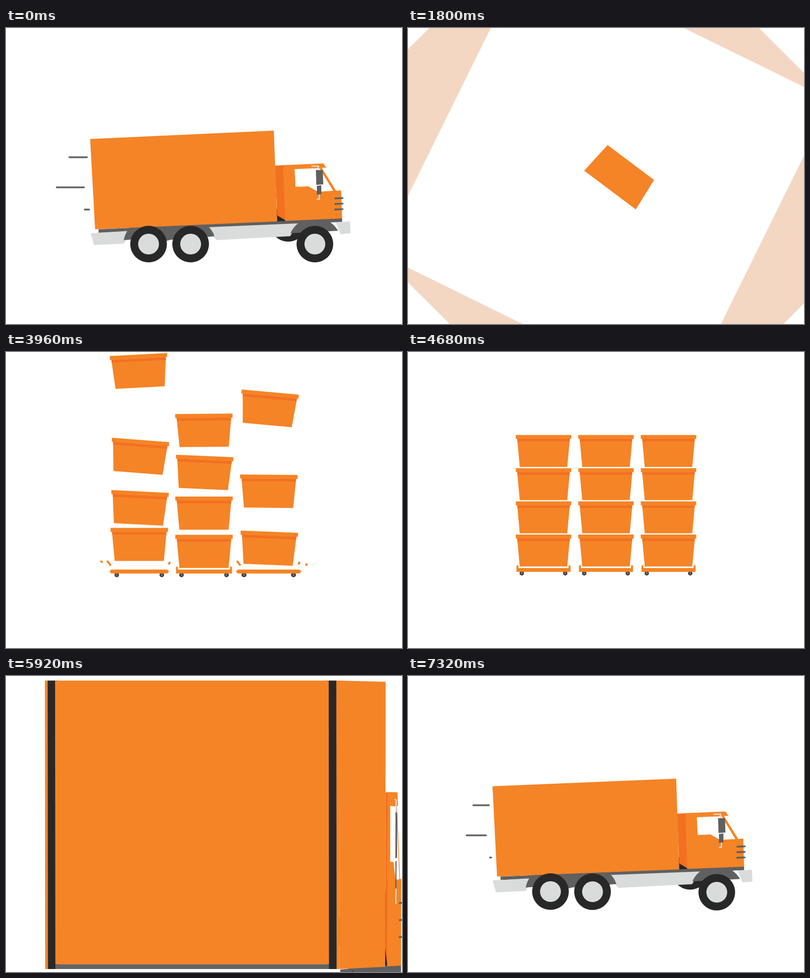
Animation, 800 px wide and 600 px high, one loop 7360 ms. Source, as an HTML page with a canvas:

```html
<!DOCTYPE html>
<html lang="en">
<head>
<meta charset="utf-8">
<title>Moving day</title>
<style>
html, body { margin: 0; width: 100%; height: 100%; overflow: hidden; background: #fff; }
canvas { display: block; width: 800px; height: 600px; }
</style>
</head>
<body>
<canvas id="stage" width="800" height="600"></canvas>
<script>
const ctx = document.getElementById('stage').getContext('2d');
const LOOP = 7360, STEP = 40;
const ORANGE = '#f58426', DEEP = '#f37021', DARK = '#282828', GREY = '#606060', PALE = '#d9dcdb', PEACH = '#f3d7c3';

const clamp = (v, a = 0, b = 1) => Math.min(b, Math.max(a, v));
const lerp = (a, b, p) => a + (b - a) * p;
const mix = (a, b, p) => a.map((v, i) => lerp(v, b[i], p));
const span = (t, a, b) => clamp((t - a) / (b - a));
const smooth = p => p * p * (3 - 2 * p);
const easeOut = (p, n = 2) => 1 - (1 - p) ** n;
const pulse = (t, a, b) => Math.sin(Math.PI * span(t, a, b));
const rad = deg => deg * Math.PI / 180;

// Perspective map taking four corners to four others, flat lists of x, y.
function perspective(from, to) {
  const m = [];
  for (let i = 0; i < 8; i += 2) {
    const x = from[i], y = from[i + 1], u = to[i], v = to[i + 1];
    m.push([x, y, 1, 0, 0, 0, -u * x, -u * y, u], [0, 0, 0, x, y, 1, -v * x, -v * y, v]);
  }
  for (let c = 0; c < 8; c++) {
    let best = c;
    for (let r = c + 1; r < 8; r++) if (Math.abs(m[r][c]) > Math.abs(m[best][c])) best = r;
    [m[c], m[best]] = [m[best], m[c]];
    for (let r = 0; r < 8; r++) {
      if (r === c) continue;
      const f = m[r][c] / m[c][c];
      for (let k = c; k < 9; k++) m[r][k] -= f * m[c][k];
    }
  }
  const h = m.map((row, i) => row[8] / row[i]);
  return (x, y) => {
    const w = h[6] * x + h[7] * y + 1;
    return [(h[0] * x + h[1] * y + h[2]) / w, (h[3] * x + h[4] * y + h[5]) / w];
  };
}

const flat = (x, y) => [x, y];
let place = flat;

function trace(pts) {
  ctx.beginPath();
  for (let i = 0; i < pts.length; i += 2) ctx.lineTo(...place(pts[i], pts[i + 1]));
}
function shape(color, ...pts) {
  trace(pts);
  ctx.fillStyle = color;
  ctx.fill();
}
function stroke(color, width, ...pts) {
  trace(pts);
  ctx.strokeStyle = color;
  ctx.lineWidth = width;
  ctx.stroke();
}
const rect = (color, l, t, r, b) => shape(color, l, t, r, t, r, b, l, b);
function disc(color, x, y, r, from = 0, to = 360) {
  const pts = [];
  for (let i = 0; i <= 48; i++) {
    const a = rad(lerp(from, to, i / 48));
    pts.push(x + r * Math.cos(a), y + r * Math.sin(a));
  }
  shape(color, ...pts);
}
function posed(x, y, tilt, scale, paint) {
  ctx.save();
  ctx.translate(x, y);
  ctx.rotate(rad(tilt));
  ctx.scale(scale, scale);
  paint();
  ctx.restore();
}

// Truck: the cargo side, seen plainly, edge-on behind the door, and half turned
const SIDE = [170, 225, 541, 208, 548, 392, 180, 408];
const EDGE_ON = [768, -30, 770, -30, 770, 630, 768, 630];
const TURNED = [274, 174, 755, 187, 749, 420, 277, 443];

// The rear rises a little about the front corner while idling.
function idleSide(t) {
  const lift = 0.004 * (t < 1400 ? smooth(span(t, 120, 560)) : 1 - span(t, 7320, LOOP));
  return SIDE.map((v, i) => i % 2 ? v + (SIDE[i - 1] - 548) * lift : v - (SIDE[i + 1] - 392) * lift);
}
const turnIn = t => span(t, 5680, 6400) ** 1.5;
function sideQuad(t) {
  if (t < 1400) return idleSide(t);
  if (t < 6400) return mix(EDGE_ON, TURNED, turnIn(t));
  return mix(TURNED, idleSide(t), easeOut(span(t, 6400, 7000)));
}

function drive(t) {
  return 754 * (1 - Math.cos(Math.PI * clamp(t / 1040))) / 2;
}

function truck(t) {
  const dx = t < 1400 ? drive(t) : 0;
  const map = perspective(SIDE, sideQuad(t));
  place = (x, y) => { const p = map(x, y); return [p[0] + dx, p[1]]; };
  const turn = t < 1400 ? 0 : 1 - span(t, 6400, 6800);

  const slide = 12 * (1 - turn);
  shape('#7b7d7d', 172 + slide, 375, 185 + slide, 375, 185 + slide, 393, 176 + slide, 393);
  disc(GREY, 318, 396 - 25 * turn, 36);
  disc(DARK, 570, 396 - 25 * turn, 37);

  // chassis, bumpers and wheel arches
  shape(GREY, 187, 408, 679, 385, 679, 393, 187, 415);
  shape(PALE, 171, 416, 254, 411, 238, 437, 178, 440);
  shape(PALE, 404, 404, 590, 396, 574, 422, 425, 430);
  shape(PALE, 666, 394, 695, 392, 696, 416, 676, 418);
  for (const x of [288, 373]) disc(GREY, x, 438, 50.6, 189, 342);
  disc(GREY, 624, 438, 54, 204, 330);

  // cab
  ctx.globalAlpha = 1 - turn;
  shape(DARK, 548, 392, 550, 386, 556, 383, 566, 391);
  ctx.globalAlpha = 1;
  shape(DEEP, 543, 279, 562, 278, 565, 390, 548, 380);
  shape(ORANGE, 560, 278, 641, 274.5, 647, 283, 638, 283.5, 667, 330, 677, 329, 679, 386, 564, 391);
  shape('#fff', 583, 286, 633, 284, 661, 330, 630, 332, 611, 321, 585, 322);
  ctx.lineCap = 'butt';
  stroke(PALE, 2.5, 617, 280, 631, 280, 631, 289);
  stroke(PALE, 2.5, 633, 337, 633, 347, 628, 347);
  shape(GREY, 626, 288, 640, 288, 641, 317, 627, 318);
  shape(GREY, 628, 320, 637, 319, 637, 337, 628, 338);
  ctx.lineCap = 'round';
  for (let i = 0; i < 3; i++) stroke(GREY, 3.6, 665, 345.5 + 11.2 * i, 680, 344.8 + 11.2 * i);

  shape(ORANGE, ...SIDE);
  for (const x of [288, 373, 624]) {
    const y = 438 + turn * (420 - x) * 0.03;
    disc(DARK, x, y, 37);
    disc(PALE, x, y, 21);
  }
  place = flat;
}

function speedLines(t) {
  const time = t > 1400 ? t - LOOP : t;
  const lead = drive(time), lag = drive(time - 90);
  ctx.lineCap = 'round';
  // right end, height, length, growth per ms
  for (const [x, y, len, rate] of [[163.5, 262, 35.5, 0.1], [157.5, 323, 55, 0.4], [168, 368, 9, 0.17]]) {
    const now = clamp(len + rate * time, 0, len + 20);
    if (now > 0) stroke(GREY, 3.6, x - now + lag, y, x + lead, y);
  }
}

// Rear doorway
const OPENING = [32, -30, 768, -30, 768, 630, 32, 630];

function doorQuad(t) {
  if (t < 5680) {
    const z = lerp(1.5, 1, smooth(span(t, 4440, 5080)));
    return OPENING.map((v, i) => i % 2 ? 300 + (v - 300) * z : 400 + (v - 400) * z);
  }
  const [x0, y0, , , , , x1, y1] = TURNED;
  const side = sideQuad(t), p = turnIn(t);
  const top = mix([32, -30], [x0, y0], p), bottom = mix([32, 630], [x1, y1], p);
  return [...top, side[0], side[1], side[6], side[7], ...bottom];
}

function doorway(t) {
  place = perspective(OPENING, doorQuad(t));
  const drop = t < 5380 ? lerp(-130, 80, smooth(span(t, 4700, 5120)))
    : lerp(80, 630, span(t, 5380, 5660) ** 2);

  // mirrored posts around the middle
  for (const s of [-1, 1]) {
    const post = (color, a, b) => rect(color, 400 + s * a, -30, 400 + s * b, 630);
    post(ORANGE, 368, 360);
    post(DARK, 361, 337);
    post('#8a8a8a', 337.3, 336.5);
  }
  const hem = Math.max(-30, drop - 11);
  rect(ORANGE, 57.5, -30, 742, hem);
  if (drop > -30) rect('#646464', 57.5, hem, 742, drop);
  if (t < 5680) strap(drop - 80);
  place = flat;
}

function strap(dy) {
  ctx.save();
  ctx.translate(0, dy);
  ctx.fillStyle = '#fff';
  ctx.fillRect(650, 17.5, 31.5, 24.5);
  ctx.strokeStyle = DARK;
  ctx.lineWidth = 11;
  ctx.lineCap = 'butt';
  ctx.beginPath();
  ctx.moveTo(662, 42);
  ctx.bezierCurveTo(659, 68, 646, 84, 646, 101);
  ctx.bezierCurveTo(648, 112, 660, 118, 670, 117.5);
  ctx.bezierCurveTo(680, 117, 687, 113, 685.5, 104);
  ctx.lineTo(670, 42);
  ctx.stroke();
  ctx.restore();
}

function squares(t) {
  const square = (color, w, h, turn) => posed(398.7, 302, turn, 1, () => rect(color, -w, -h, w, h));
  const a = (t - 1360) / 440, b = Math.max(0, (t - 1480) / 320);
  square(PEACH, 465 * a, 433 * a, 45 * a);
  square('#fff', 341 * b, 341 * b, 26.2 * b);
}

// Crates; the origin is the middle of a crate.
function crate(x, y, s, tilt, lid = 0, lidWidth = 1) {
  posed(x, y, tilt, s, () => {
    shape(ORANGE, -48.5, -23, 48.5, -23, 43.7, 29, -43.7, 29);
    if (lid > -3) shape(DEEP, -48.5, -23, 48.5, -23, 48, -18, -48, -18);
    rect(ORANGE, -51 * lidWidth, lid - 30, 51 * lidWidth, lid - 22.8);
  });
}

const BIG = 1.824, MID = 1.137;

function camera(t) {
  const z = t < 4440 ? lerp(BIG, MID, span(t, 3040, 3960)) : lerp(MID, 1, smooth(span(t, 4440, 5120)));
  return [z, 434 + 62 * (z - 1) ** 0.714];
}

// Spins in, takes its lid, then drops onto the middle dolly.
function soloCrate(t) {
  const p = span(t, 1520, 2120), fall = span(t, 3040, 3520);
  const [z, ground] = camera(t);
  const size = z * easeOut(p, 2.13) * (1 + 0.06 * pulse(t, 2000, 2280));
  const spin = -0.447 * Math.max(0, 2120 - t);
  const wobble = -3 * span(t, 2840, 3040) * (1 - fall);
  const air = 323 - 36 * (1 - p) + 4 * pulse(t, 2600, 2800);
  const y = lerp(air, ground - 39 * z, fall ** 2);
  const lid = lerp(-77, 0, span(t, 2360, 2600) ** 2);
  crate(400 + 50 * (1 - p), y, size, spin + wobble, lid, smooth(span(t, 2200, 2360)));
}

function dolly(x, sx, fold) {
  ctx.save();
  ctx.translate(x, 0);
  ctx.scale(sx, 1);
  for (const w of [-40, 40]) {
    disc('#3c3a3a', w, 436.5, 4);
    disc('#777', w, 436.5, 1.8);
  }
  const tip = lerp(53, 49.75, fold);
  shape(ORANGE, -tip, 430.5, -49.75, 427, 49.75, 427, tip, 430.5, 49.75, 434, -49.75, 434);
  if (fold > 0) {
    for (const s of [-1, 1]) rect(ORANGE, s * 49.75, 427 - 5 * fold, s * 46, 428);
  }
  ctx.restore();
}

// Crates land one after another, each column at its own pace.
const columns = [
  { start: 20, gain: 6, power: 3.2, tilts: [0, 2.9, 4.5, -3] },
  { start: 0, gain: 11, power: 1.4, tilts: [0, 0, 2.5, -0.5] },
  { start: 9, gain: 65, power: 1.65, tilts: [2.2, 0.5, 5.2, -4] }
];

function stacks(t) {
  const [z, ground] = camera(t);
  ctx.save();
  ctx.translate(400, ground);
  ctx.scale(z, z);
  ctx.translate(0, -434);
  if (t > 3360) {
    const spread = 115 * smooth(span(t, 3360, 3640)), fold = span(t, 3960, 4160);
    dolly(-spread, 1, fold);
    dolly(spread, 1 + 0.1 * pulse(t, 3880, 4040), fold);
  }
  dolly(0, smooth(span(t, 2950, 3240)) + 0.08 * pulse(t, 3200, 3400), span(t, 3500, 3700));
  columns.forEach(({ start, gain, power, tilts }, c) => tilts.forEach((tilt, row) => {
    if (c === 1 && row === 0) return;
    const late = start + gain * row ** power, wait = 3960 + late - t;
    const bounce = 2 * pulse(-wait, 0, 160);
    const y = 395 - 61.3 * row - 0.62 * Math.max(0, wait) - bounce;
    crate((c - 1) * 115, y, 1, tilt * clamp(wait / late));
  }));
  ctx.restore();
}

// Chips fly off both ends of the outer dollies.
function debris(t) {
  const size = 1 - Math.abs(t - 3960) / 120;
  if (size <= 0) return;
  const out = (t - 3960) / 10;
  for (const side of [-1, 1]) for (const end of [-1, 1]) {
    const x = 400 + 131 * side + end * (61 + out), y = 428 - out / 4;
    const long = end < 0 ? 6 : 3;
    posed(x, y, end < 0 ? -38 : 25, size, () => rect(ORANGE, -2, -long, 2, long));
    if (side === end) posed(x + end * 15, y + 3 * side, 20 * -side, size, () => rect(ORANGE, -2.5, -2, 2.5, 2));
  }
}

function draw(t) {
  ctx.fillStyle = '#fff';
  ctx.fillRect(0, 0, 800, 600);
  if (t < 1040 || t > 6960) speedLines(t);
  if (t < 1040) truck(t);
  if (t >= 1400 && t < 2160) squares(t);
  if (t >= 2960 && t < 5680) stacks(t);
  if (t > 1520 && t < 5680) soloCrate(t);
  debris(t);
  if (t > 5680) truck(t);
  if (t >= 4440 && t < 6400) doorway(t);
}

const start = performance.now();
function tick() {
  const t = (performance.now() - start) % LOOP;
  draw(Math.floor(t / STEP) * STEP);
  requestAnimationFrame(tick);
}
tick();
</script>
</body>
</html>
```
